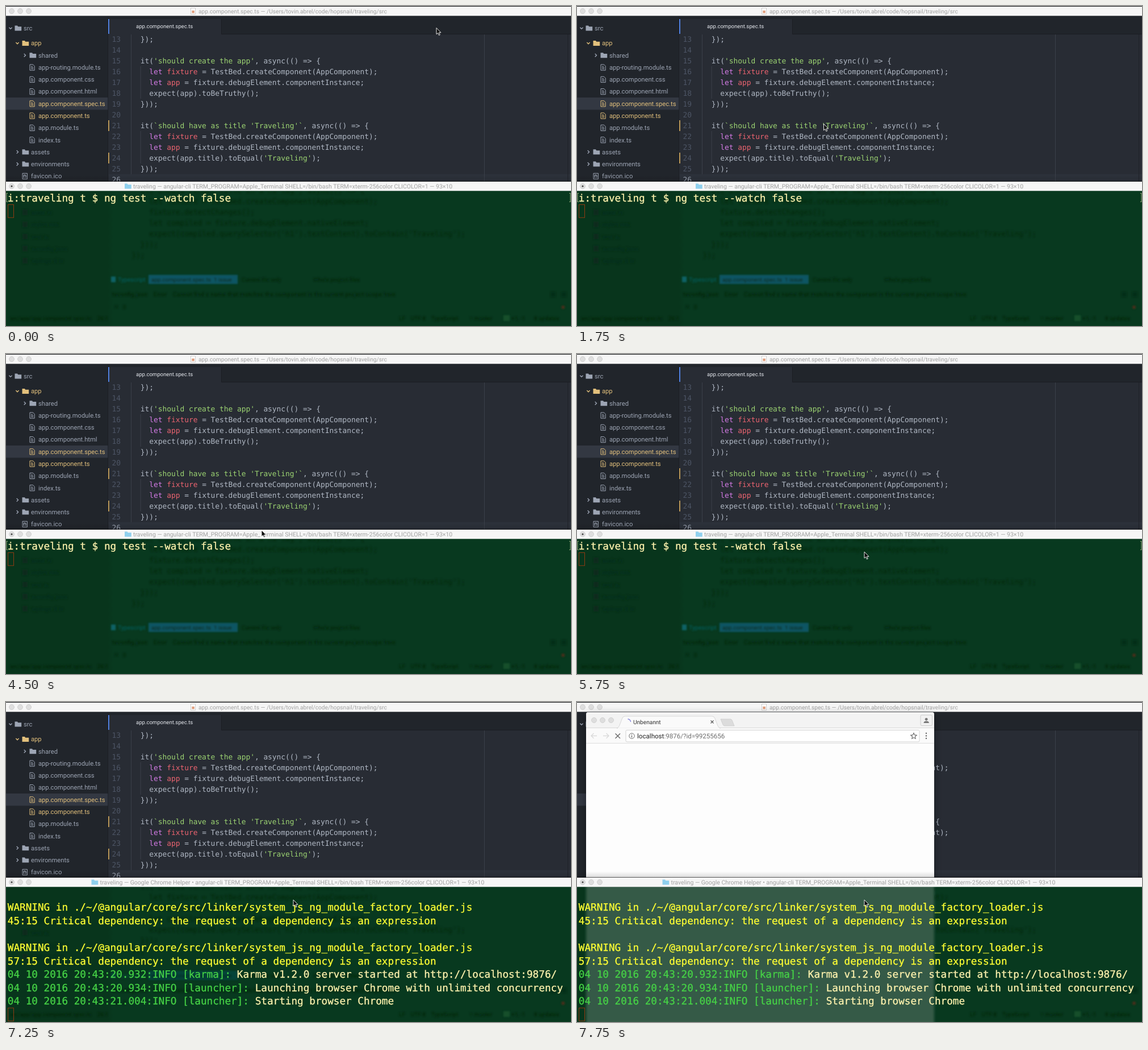
These frames come from a looping animation (995x563 px, 8 s). An HTML page:

```html
<!DOCTYPE html>
<html lang="en">
<head>
<meta charset="utf-8">
<title>Test run</title>
<style>
html, body { margin: 0; width: 100%; height: 100%; overflow: hidden; background: #21252b; }
svg { display: block; width: 995px; height: 563px; }
text { white-space: pre; text-rendering: geometricPrecision; }
.ui { font-family: Roboto, Inter, sans-serif; }
.code { font: 12.85px "DejaVu Sans Mono", monospace; }
.term { font: 17.66px "DejaVu Sans Mono", monospace; stroke-width: .3px; }
</style>
</head>
<body>
<svg id="stage" viewBox="0 0 995 563" xmlns="http://www.w3.org/2000/svg"></svg>
<script>
const LOOP = 8000;
const GOLD = '#e2c07c', GREY = '#9da5b4', PALE = '#fff3ae', YELLOW = '#ffff33', GREEN = '#46d246';

const esc = s => s.replace(/&/g, '&amp;').replace(/</g, '&lt;').replace(/>/g, '&gt;');
const rect = (x, y, w, h, fill, more = '') =>
  `<rect x="${x}" y="${y}" width="${w}" height="${h}" fill="${fill}" ${more}/>`;
const line = (d, color, width = 1, more = '') =>
  `<path d="${d}" fill="none" stroke="${color}" stroke-width="${width}" ${more}/>`;
const ui = (x, y, size, fill, s, more = '') =>
  `<text class="ui" x="${x}" y="${y}" font-size="${size}" fill="${fill}" ${more}>${esc(s)}</text>`;
const span = (s, fill, more = '') => `<tspan fill="${fill}" ${more}>${esc(s)}</tspan>`;

const lights = (x, y) => [0, 15, 30].map(dx =>
  `<circle cx="${x + dx}" cy="${y}" r="4.5" fill="#dedede" stroke="#cbcbcb" stroke-width=".8"/>`).join('');
// The window edge is a dark hairline just above the bar.
const titleBar = y => rect(0, y, 995, 1, '#000', 'opacity=".6"') + rect(0, y + 1, 995, 16.3, '#f6f6f6') + lights(10, y + 9);

const folder = (x, y, fill) =>
  `<path d="M${x} ${y - 4.5}h4.5l1.2 1.8h6v7.2h-11.7z" fill="${fill}"/>`;
const fileIcon = (x, y, color) =>
  line(`M${x} ${y - 5}h5.6l2.6 2.8v7.4h-8.2zM${x + 2} ${y - 1.6}h3M${x + 2} ${y + 0.5}h4.2M${x + 2} ${y + 2.7}h4.2`, color);
const chevron = (x, y, open, color) =>
  line(open ? `M${x - 2.6} ${y - 1.3}l2.6 2.6l2.6-2.6` : `M${x - 1.3} ${y - 2.8}l2.8 2.8l-2.8 2.8`, color, 1.4);

// Editor: file tree
function treeView() {
  const rows = [
    ['app', 1, 'open', GOLD], ['shared', 2, 'closed'], ['app-routing.module.ts', 2],
    ['app.component.css', 2], ['app.component.html', 2], ['app.component.spec.ts', 2, '', GOLD],
    ['app.component.ts', 2, '', GOLD], ['app.module.ts', 2], ['index.ts', 2],
    ['assets', 1, 'closed'], ['environments', 1, 'closed'], ['favicon.ico', 1, 'ico']];
  let out = rect(0, 17, 180, 292, '#21252b') + rect(0, 161, 180, 21.5, '#333842');
  out += chevron(8, 39, true, GREY) + folder(15.5, 39, GREY) + ui(31, 43, 11.2, GREY, 'src');
  rows.forEach(([name, depth, kind, color = GREY], i) => {
    const y = 65.4 + 21.27 * i, x = 18 + 13 * depth;
    if (kind === 'ico') {
      out += line(`M${x - 2} ${y - 5}h8.4v10h-8.4z`, color) +
        line(`M${x + 0.5} ${y + 3}v-5h2.2q1.2 0 1.2 1.4v3.6`, color, 1.3);
    } else if (kind) {
      out += chevron(x - 11, y, kind === 'open', color) + folder(x - 2.5, y, color);
    } else {
      out += fileIcon(x - 2, y, color);
    }
    out += ui(x + 13, y + 4, 11.2, color, name);
  });
  return out;
}

function highlight(src) {
  const token = /(`[^`]*`|'[^']*')|\b(let)( \w+)/g;
  let out = '', at = 0;
  for (const m of src.matchAll(token)) {
    out += esc(src.slice(at, m.index));
    out += m[1] ? span(m[1], '#9cd472') : span(m[2], '#d47be6') + span(m[3], '#ec6470');
    at = m.index + m[0].length;
  }
  return out + esc(src.slice(at));
}

const codeLine = (y, col, body, more) =>
  `<text class="code" x="${221.4 + 7.735 * col}" y="${y}" ${more}>${body}</text>`;
const FIXTURE = 'let fixture = TestBed.createComponent(AppComponent);';

// Editor: tab bar and code
function codeView() {
  const app = 'let app = fixture.debugElement.componentInstance;';
  const code = [
    [2, '});'], [0, ''], [2, "it('should create the app', async(() => {"],
    [4, FIXTURE], [4, app], [4, 'expect(app).toBeTruthy();'], [2, '}));'], [0, ''],
    [2, "it(`should have as title 'Traveling'`, async(() => {"],
    [4, FIXTURE], [4, app], [4, "expect(app.title).toEqual('Traveling');"], [2, '}));'], [0, '']];
  let out = rect(180, 17, 815, 33, '#21252b') + rect(180, 49.5, 815, 260, '#282c34') +
    rect(180, 49, 815, 1, '#1b1d23') + rect(180, 23, 199, 27, '#282c34') + rect(379, 23, 1, 26, '#1b1d23') +
    rect(180, 23, 1.8, 26, '#568af2') + ui(229, 39, 9.55, '#e4e7ec', 'app.component.spec.ts');
  out += rect(181, 296, 814, 13, '#2c313a') + rect(842, 50, 1, 259, '#3a3f49') + rect(989, 50, 1, 259, '#1f2228');
  out += rect(220, 50, 1, 246, '#3a3f49') + rect(236.5, 106, 1, 57, '#3a3f49') + rect(236.5, 220, 1, 57, '#3a3f49');
  out += rect(180, 201, 1.8, 19, '#c9a45c') + rect(180, 258, 1.8, 19, '#c9a45c');
  code.forEach(([col, src], i) => {
    const y = 62.8 + 19 * i, current = i === code.length - 1;
    out += `<text class="code" x="202" y="${y}" text-anchor="end" fill="${current ? '#9aa2b0' : '#4d5565'}">${13 + i}</text>`;
    out += codeLine(y, col, highlight(src), 'fill="#b0b8c4"');
  });
  return out;
}

function editor() {
  return treeView() + codeView() + rect(179.3, 17, 0.7, 292, '#1b1d23') + titleBar(0) +
    rect(325.5, 3.5, 8, 11, '#fff', 'stroke="#c4c4c4" stroke-width=".8"') + rect(327.3, 8, 4.5, 4.5, '#e0a080') +
    ui(339, 13, 10.2, '#a2a2a2', 'app.component.spec.ts — /Users/tovin.abrel/code/hopsnail/traveling/src');
}

function browser() {
  return `<g id="browser">` +
    rect(16, 18, 613, 300, '#fdfdfd', 'rx="4" filter="url(#shadow)"') +
    `<path d="M16 46V22q0-4 4-4H625q4 0 4 4V46z" fill="#f3f3f3"/>` + lights(30, 32) +
    rect(16, 45.5, 613, 27, '#fafafa') + rect(16, 45, 613, 0.8, '#d2d2d2') + rect(16, 72.3, 613, 0.8, '#d6d6d6') +
    `<path d="M70 46q3-.5 4.500-4l5-13q1.500-4 5-4H238q3.500 0 5 4l5 13q1.500 3.500 4.500 4z" fill="#fafafa" stroke="#cbcbcb" stroke-width=".7"/>` +
    rect(72, 45.5, 179, 2, '#fafafa') +
    `<path d="M253 30h17q2 0 3 2l4 10h-17q-2 0-3-2z" fill="#dcdcdc" stroke="#c8c8c8" stroke-width=".7"/>` +
    line('M89.500 30a5 5 0 0 1 5 5', '#8c8c98', 1.3, 'id="spinner"') +
    ui(99, 38.5, 10.1, '#333', 'Unbenannt') + line('M235.500 32.500l5 5m0-5l-5 5', '#555', 1.1) +
    rect(605, 23, 20.5, 18.5, '#f1f1f1', 'rx="2" stroke="#c4c4c4" stroke-width=".8"') +
    `<circle cx="615.200" cy="30.300" r="2.400" fill="#777"/><path d="M610.500 37q0-3.600 4.700-3.600t4.700 3.600z" fill="#777"/>` +
    line('M35 59.500h-10m4.500-4.500l-4.500 4.500l4.500 4.500M46 59.500h10m-4.500-4.500l4.500 4.500l-4.500 4.500', '#dadada', 1.3) +
    line('M67.500 55.500l8.500 8.500m0-8.500l-8.500 8.500', '#666', 1.4) +
    rect(86, 49.5, 517, 20.5, '#fff', 'rx="2" stroke="#cacaca" stroke-width=".8"') +
    `<circle cx="96.500" cy="59.700" r="4.700" fill="none" stroke="#666"/>` + line('M96.500 57v1.200m0 1v3.200', '#555', 1.2) +
    `<text class="ui" x="106" y="63.600" font-size="11.6">${span('localhost', '#222')}${span(':9876/?id=99255656', '#6c6c6c')}</text>` +
    line('M593 54.500l1.500 3.400l3.700.4l-2.800 2.500l.8 3.700l-3.200-1.900l-3.200 1.900l.8-3.700l-2.800-2.500l3.700-.4z', '#666', 1.1) +
    [55, 59.5, 64].map(y => `<circle cx="615" cy="${y}" r="1.200" fill="#666"/>`).join('') + `</g>`;
}

// What shows faintly through the terminal
function backdrop() {
  const rows = [
    [2, "it('should render title in a h1 tag', async(() => {"], [4, FIXTURE], [4, 'fixture.detectChanges();'],
    [4, 'let compiled = fixture.debugElement.nativeElement;'],
    [4, "expect(compiled.querySelector('h1').textContent).toContain('Traveling');"], [2, '}));'], [0, '});']];
  const dim = '#04230f';
  const note = (x, y, s, size = 10) => ui(x, y, size, dim, s);
  let out = `<g clip-path="url(#ghostClip)"><g fill="${dim}" filter="url(#blur)">`;
  out += rows.map(([col, s], i) => codeLine(328.8 + 19 * i, col, esc(s), 'opacity=".75"')).join('');
  out += `<g id="leftGhost">`;
  ['main.ts', 'styles.css', 'test.ts', 'tsconfig.json', 'typings.d.ts'].forEach((s, i) => {
    const y = 363 + 21.27 * i;
    out += rect(29, y - 5, 9, 10, '#0a2c1a') + ui(44, y + 4, 11.2, '#082a17', s);
  });
  out += `<g id="panelTabs">` + rect(251, 473, 157, 16, '#0b5563') + rect(185, 476, 8, 10, '#0b6266') +
    ui(197, 485, 10.5, '#0b6266', 'Typescript') + `</g>` +
    note(256, 485, 'app.component.spec.ts  1 issue') + note(415, 485, 'Current file only') + note(541, 485, 'Whole project files') +
    note(187, 511, 'tsconfig.json    Error    Cannot find a name that matches the component in the current project scope here', 10.8) +
    note(190, 533, '✕   0') + note(7, 553, 'src/app/app.component.spec.ts    26:1') + `</g>`;
  out += note(692, 553, 'LF    UTF-8    TypeScript') + note(816, 553, '⑂ master') + note(930, 553, '8 updates') +
    rect(876, 544, 11, 10, '#18502a') + note(890, 553, '+1, -1') +
    rect(959, 503, 9, 9, dim, 'opacity=".6"') + rect(978, 503, 9, 9, dim, 'opacity=".6"');
  return out + `<circle cx="981" cy="530" r="3" fill="#4a2c14"/></g></g>`;
}

// A thin stroke gives the text the weight of smoothed screen type.
const termRow = (row, ...parts) =>
  `<text class="term" x="2.800" y="${343.6 + 23.6 * (row - 1)}">${parts.map(([s, c]) => span(s, c, `stroke="${c}"`)).join('')}</text>`;
const caret = row => rect(3.5, 349.5 + 23.6 * (row - 2), 10, 22.8, 'none', 'stroke="#8e3a12"');

function output() {
  const warn = (row, place) =>
    termRow(row, ['WARNING in ./~/@angular/core/src/linker/system_js_ng_module_factory_loader.js', YELLOW]) +
    termRow(row + 1, [place + ' Critical dependency: the request of a dependency is an expression', YELLOW]);
  const log = (row, time, who, msg) =>
    termRow(row, [`04 10 2016 20:43:${time}:INFO [${who}]: `, GREEN], [msg, PALE]);
  return warn(2, '45:15') + warn(5, '57:15') +
    log(7, '20.932', 'karma', 'Karma v1.2.0 server started at http://localhost:9876/') +
    log(8, '20.934', 'launcher', 'Launching browser Chrome with unlimited concurrency') +
    log(9, '21.004', 'launcher', 'Starting browser Chrome') + caret(10);
}

function terminal() {
  const env = 'angular-cli TERM_PROGRAM=Apple_Terminal SHELL=/bin/bash TERM=xterm-256color CLICOLOR=1 — 93×10';
  const heading = (id, x, s) => `<g id="${id}">${folder(x - 15, 317, '#8fd0ee')}${ui(x, 321, 10.5, '#a2a2a2', s)}</g>`;
  return rect(0, 298, 995, 11, 'url(#lift)') + rect(0, 325, 995, 238, 'url(#grass)') +
    `<g id="glow">${rect(16, 318, 613, 260, '#355a46', 'filter="url(#soft)"')}</g>` + backdrop() + titleBar(308) +
    `<circle cx="10" cy="317" r="1.600" fill="#444"/>` +
    heading('idleTitle', 224, 'traveling — ' + env) +
    heading('busyTitle', 165.5, 'traveling — Google Chrome Helper • ' + env) +
    `<g id="prompt">${termRow(1, ['i:traveling t $ ng test --watch false', PALE])}${caret(2)}` +
    line('M3 329.500h-2v15h2M992 329.500h2v15h-2', '#a9b98a', 0.9) + `</g>` +
    `<g id="output">${output()}</g>`;
}

const stage = document.getElementById('stage');
stage.innerHTML = `<defs>
  <filter id="blur" x="-5%" y="-5%" width="110%" height="110%"><feGaussianBlur stdDeviation="1.500"/></filter>
  <filter id="soft" x="-5%" y="-5%" width="110%" height="110%"><feGaussianBlur stdDeviation="2"/></filter>
  <filter id="shadow" x="-10%" y="-15%" width="120%" height="130%"><feDropShadow dx="0" dy="4" stdDeviation="7" flood-opacity=".4"/></filter>
  <linearGradient id="lift" x1="0" y1="0" x2="0" y2="1"><stop stop-opacity="0"/><stop offset="1" stop-opacity=".14"/></linearGradient>
  <linearGradient id="grass"><stop offset=".18" stop-color="#08351c"/><stop offset=".19" stop-color="#08391f"/></linearGradient>
  <clipPath id="ghostClip"><rect id="ghostArea" y="326" width="995" height="237"/></clipPath>
</defs>` + editor() + browser() + terminal() +
  `<path id="pointer" d="M0 0V11.200L2.600 8.900L4.400 13L6.200 12.200L4.500 8.300H8Z" fill="#0c0c0c" stroke="#fff" stroke-width=".9"/>`;

// Pointer stops: time, x, y. The screen is sampled every 250 ms, so it jumps.
const stops = [
  [0, 758, 38.5], [250, 457, 190], [500, 460, 214],
  [1000, 446, 290], [1250, 436, 371], [1500, 431, 270], [1750, 434.5, 207.5], [2000, 428, 249],
  [2250, 456, 215], [2500, 497, 205], [2750, 470, 194], [3000, 440, 204], [3250, 451.5, 201],
  [3750, 470, 250], [4000, 524, 270], [4250, 490, 280], [4500, 450, 310], [4750, 430, 348],
  [5000, 470, 290], [5250, 547, 269], [5500, 530, 320], [5750, 506, 348]];

const part = {};
stage.querySelectorAll('[id]').forEach(el => part[el.id] = el);
const show = (id, on) => part[id].setAttribute('visibility', on ? 'visible' : 'hidden');

function draw(t) {
  const [, x, y] = stops.filter(s => s[0] <= t).pop();
  part.pointer.setAttribute('transform', `translate(${x} ${y})`);
  const printed = t >= 7000, helper = t >= 7250, opened = t >= 7500;
  show('prompt', !printed);
  show('output', printed);
  show('idleTitle', !helper);
  show('busyTitle', helper);
  show('browser', opened);
  show('glow', opened);
  show('leftGhost', !opened);
  part.panelTabs.setAttribute('opacity', printed ? 0.4 : 1);
  part.spinner.setAttribute('stroke', t >= 7750 ? '#8080dc' : '#8c8c98');
  // Behind the browser window only the right-hand side shines through.
  part.ghostArea.setAttribute('x', opened ? 629 : 0);
}

const start = performance.now();
function tick() {
  draw((performance.now() - start) % LOOP);
  requestAnimationFrame(tick);
}
draw(0);
requestAnimationFrame(tick);
</script>
</body>
</html>
```
